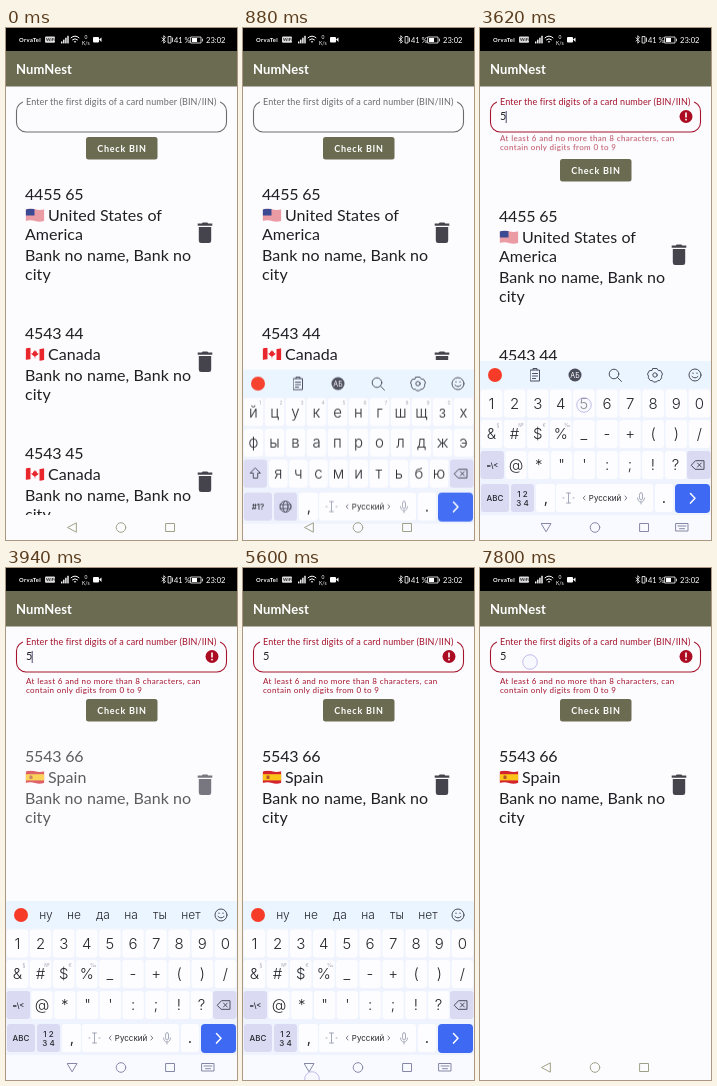
Animation, 231 px wide and 512 px high, one loop 8 s. Source, as an HTML page:

```html
<!DOCTYPE html>
<html lang="en">
<head>
<meta charset="utf-8">
<title>Card number lookup</title>
<style>
  html, body { margin: 0; width: 100%; height: 100%; overflow: hidden; background: #fcfcff; }
  svg { display: block; width: 231px; height: 512px; }
  text { font-family: Lato, "Open Sans", sans-serif; fill: #1f1e23; }
  .kb text { font-family: Inter, Roboto, sans-serif; font-feature-settings: "calt" 0; fill: #25262c; text-anchor: middle; }
  .kb .faint { fill: #a5a8b8; }
  .item text { font-size: 16px; letter-spacing: .06px; }
  .item .num { letter-spacing: -.2px; }
  .line { fill: none; stroke: currentColor; stroke-width: 1; stroke-linejoin: round; stroke-linecap: round; }
  .ring { fill: #f4f3ff80; stroke: #b3afe2; stroke-width: .8; }

  /* 1% = 80 ms */
  .field, .body, .step { animation: 8s step-end infinite; }
  .field { animation-name: field; }
  .body { animation-name: shift; }
  .typed { animation-name: typed; }
  .caret0 { animation-name: caret0; }
  .caret1 { animation-name: caret1; }
  .letters { animation-name: letters; }
  .symbols { animation-name: symbols; }
  .tools { animation-name: tools; }
  .hints { animation-name: hints; }
  .cover { animation-name: cover; }
  .nav { animation-name: nav; }
  .kbnav { animation-name: kbnav; }
  .tap5 { animation-name: tap5; }
  .tapBack { animation-name: tapBack; }
  .tapField { animation-name: tapField; }
  .helper { animation: helper 8s linear infinite; }
  .all { animation: all 8s linear infinite; }
  .found { animation: found 8s linear infinite; }
  .kb { animation: kb 8s linear infinite; }

  @keyframes field { 0% { color: #6c6a6c } 44%, 100% { color: #a5142c } }
  @keyframes shift { 0% { transform: none } 44%, 100% { transform: translateY(22px) } }
  @keyframes typed { 0% { opacity: 0 } 44%, 100% { opacity: 1 } }
  @keyframes caret0 {
    0%, 17.5%, 32.75%, 100% { opacity: 0 }
    12.5%, 25.25% { opacity: 1 }
  }
  @keyframes caret1 {
    0%, 51%, 63%, 78.25%, 92.5%, 100% { opacity: 0 }
    44%, 54.875%, 73.5%, 85% { opacity: 1 }
  }
  @keyframes letters { 0% { opacity: 1 } 26.25%, 100% { opacity: 0 } }
  @keyframes symbols { 0% { opacity: 0 } 26.25%, 100% { opacity: 1 } }
  @keyframes tools { 0% { opacity: 1 } 47.5%, 100% { opacity: 0 } }
  @keyframes hints { 0% { opacity: 0 } 47.5%, 100% { opacity: 1 } }
  @keyframes cover { 0%, 77.5%, 100% { opacity: 0 } 8% { opacity: 1 } }
  @keyframes nav { 0%, 73.5%, 100% { opacity: 1 } 12.5% { opacity: 0 } }
  @keyframes kbnav { 0%, 73.5%, 100% { opacity: 0 } 12.5% { opacity: 1 } }
  @keyframes tap5 { 0%, 45.75%, 100% { opacity: 0 } 40.25% { opacity: 1 } }
  @keyframes tapBack { 0%, 73.5%, 100% { opacity: 0 } 70% { opacity: 1 } }
  @keyframes tapField { 0% { opacity: 0 } 97.5%, 100% { opacity: 1 } }
  @keyframes helper {
    0%, 43.99% { opacity: 0; transform: translateY(-5px) }
    44% { opacity: .6; transform: translateY(-5px) }
    47%, 100% { opacity: 1; transform: none }
  }
  @keyframes all { 0%, 46.5% { opacity: 1 } 48%, 100% { opacity: 0 } }
  @keyframes found { 0%, 48% { opacity: 0 } 49.75%, 100% { opacity: 1 } }
  @keyframes kb {
    0%, 8% { opacity: 0; transform: translateY(160px) }
    9.5% { opacity: .75; transform: translateY(56.5px); animation-timing-function: ease-out }
    11.75%, 73.75% { opacity: 1; transform: none; animation-timing-function: ease-in }
    75.5% { opacity: .55; transform: translateY(30px) }
    77.25%, 100% { opacity: 0; transform: translateY(120px) }
  }
</style>
</head>
<body>
<svg id="stage" viewBox="0 0 231 512"></svg>
<script>
const BG = '#fcfcff', OLIVE = '#6b6b52';

const text = (x, y, size, str, attrs = '') =>
  `<text x="${x}" y="${y}" font-size="${size}" ${attrs}>${str}</text>`;
const rect = (x, y, w, h, fill, r = 0, attrs = '') =>
  `<rect x="${x}" y="${y}" width="${w}" height="${h}" rx="${r}" fill="${fill}" ${attrs}/>`;
const group = (cls, ...parts) => `<g class="${cls}">${parts.join('')}</g>`;
const line = (d, color, attrs = '') => `<path class="line" d="${d}" color="${color}" ${attrs}/>`;
const ring = (cls, x, y) => `<circle class="ring step ${cls}" cx="${x}" cy="${y}" r="7.3"/>`;

// Status bar
const white = 'style="fill:#fff"';
const bars = [0, 1, 2, 3].map(i => rect(55 + i * 2.1, 13.5 - i * 1.9, 1.4, 1.9 + i * 1.9, '#fff')).join('');
const status = rect(0, 0, 231, 23, '#000') +
  text(13, 14, 5.8, 'OrvaTel', `${white} font-weight="700" letter-spacing=".4"`) +
  rect(39, 8.5, 10, 6.2, '#ddd', 1) + text(40, 13.3, 4.4, 'WiFi', 'font-weight="700"') +
  bars +
  line('M65 9.8q4-3.6 8 0M66.5 11.8q2.5-2.3 5 0M68.3 13.8h1.4', '#fff', 'stroke-width="1.2"') +
  text(78.5, 10.5, 5, '0', white) + text(76, 16.5, 5, 'K/s', white) +
  rect(87, 9, 6, 5.5, '#fff', 1) + '<path d="M93 11.5l2.5-2v4.5z" fill="#fff"/>' +
  line('M156 9.8l3.600 3.600-1.800 1.800V7.700l1.800 1.800-3.600 3.600', '#fff', 'style="stroke-width:.8"') +
  line('M162.500 8.500h2.500v6.500h-2.500zM166.500 10v3.500', '#fff', 'style="stroke-width:.8"') +
  text(168, 14.5, 7.4, '41 %', white) +
  line('M185 9h10v6h-10zM196.500 11v2', '#fff', 'style="stroke-width:.8"') + rect(186, 10, 5, 4, '#fff') +
  text(200, 14.5, 7.6, '23:02', white);

const appBar = rect(0, 23, 231, 35.5, OLIVE) +
  text(10, 46, 13, 'NumNest', `${white} font-weight="700" letter-spacing=".1"`);

// Input field
const red = 'style="fill:#a5142c"';
const helper = (y, str) => text(20, y, 8, str, `${red} letter-spacing=".36"`);
const field = group('field',
  '<rect class="line" x="10.5" y="73.500" width="210" height="30.500" rx="9.500" style="stroke-width:1.100"/>',
  rect(17, 71, 197, 5, BG),
  text(20, 77, 9, 'Enter the first digits of a card number (BIN/IIN)',
    'style="fill:currentColor" letter-spacing=".11"')) +
  rect(20.5, 83, 1, 12, '#4a4a70', 0, 'class="step caret0"') +
  group('step typed',
    text(20, 92, 11, '5'),
    '<circle cx="206" cy="88.500" r="6.500" fill="#ab0c22"/>',
    rect(205.2, 84.5, 1.6, 5, '#fff'), rect(205.2, 90.8, 1.6, 1.6, '#fff')) +
  rect(25.7, 83, 1, 12, '#4a4a70', 0, 'class="step caret1"') +
  group('helper',
    helper(116, 'At least 6 and no more than 8 characters, can'),
    helper(125, 'contain only digits from 0 to 9'));

// List
const flags = {
  us: rect(0, 0, 19, 14, '#fff') +
    Array.from({ length: 7 }, (_, i) => rect(0, i * 2, 19, 1, '#d8394a')).join('') +
    rect(0, 0, 9, 7, '#3c4a94'),
  ca: rect(0, 0, 19, 14, '#fff') + rect(0, 0, 5, 14, '#e8262c') + rect(14, 0, 5, 14, '#e8262c') +
    '<path d="M9.500 2.500l1 1.800 1-.4-.2 2 1.700-.6-.4 1.600-2.600 2h-.3v2h-.5v-2h-.3l-2.600-2-.4-1.600 1.700.6-.2-2 1 .4z" fill="#e8262c"/>',
  es: rect(0, 0, 19, 14, '#d3232f') + rect(0, 3.7, 19, 6.2, '#fcc419') + rect(4, 5, 3, 3.5, '#b4552d', .5)
};
const trash = y => `<g transform="translate(199 ${y})" fill="#45444d">
  <path d="M-7.300-9.500h4l1-1h4.600l1 1h4v2.200h-14.600zM-6.200-6h12.400v13.500q0 2.500-2.300 2.500h-7.800q-2.300 0-2.300-2.500z"/></g>`;
const item = (y, num, flag, ...country) => {
  const bank = y + 21 + 19 * (country.length - 1) + 21;
  return group('item',
    text(19, y, 16, num, 'class="num"'),
    `<g transform="translate(19.5 ${y + 8.5})" clip-path="url(#wave)">${flags[flag]}</g>`,
    country.map((c, i) => text(i ? 19 : 42, y + 21 + i * 19, 16, c)).join(''),
    text(19, bank, 16, 'Bank no name, Bank no'),
    text(19, bank + 19, 16, 'city'),
    trash(y + (country.length > 1 ? 33 : 23)));
};
const body = group('body',
  rect(80, 109, 71.5, 22.5, OLIVE, 2.5),
  text(116, 124, 9, 'Check BIN', `${white} font-weight="700" text-anchor="middle" letter-spacing=".75"`),
  group('all',
    item(172, '4455 65', 'us', 'United States of', 'America'),
    item(311, '4543 44', 'ca', 'Canada'),
    item(431, '4543 45', 'ca', 'Canada')),
  group('found', item(172, '5543 66', 'es', 'Spain')));

// Keyboard
const INK = '#4b4d5c', SPECIAL = '#dadaf3';
const rows = [375.5, 406, 437, 470];
const keys = (str, row, x0, step, small = '') => str.split(' ').map((c, i) => {
  const x = x0 + i * step, y = rows[row];
  return rect(x - step / 2 + .8, y - 14, step - 1.6, 28, '#fdfdff', 3) +
    text(x, y + 5, 15, c, 'font-weight="300"') +
    (small[i] ? text(x + 6.5, y - 7.5, 5, small[i], 'class="faint"') : '');
}).join('');
const special = (x, w, row, label = '', size = 8) =>
  rect(x, rows[row] - 14, w, 28, SPECIAL, 3) +
  text(x + w / 2, rows[row] + 3, size, label, 'font-weight="500"');

const letters = group('step letters',
  keys('й ц у к е н г ш щ з х', 0, 10.5, 21, '1234567890'),
  keys('ф ы в а п р о л д ж э', 1, 10.5, 21),
  keys('я ч с м и т ь б ю', 2, 35.3, 20.1),
  special(.5, 23.5, 2),
  line('M12.500 431.500l5 5h-2.800v5h-4.400v-5h-2.800z', INK),
  special(1, 28, 3, '#1?'),
  special(31, 23, 3),
  '<circle class="line" cx="42.500" cy="470" r="5.500"/><ellipse class="line" cx="42.500" cy="470" rx="2.500" ry="5.500"/>',
  line('M37 468h11M37 472h11', INK));
const symbols = group('step symbols',
  keys('1 2 3 4 5 6 7 8 9 0', 0, 11.5, 23.1),
  keys('&amp; # $ % _ - + ( ) /', 1, 11.5, 23.1, '§№€‰'),
  keys('@ * " \' : ; ! ?', 2, 36, 22.8),
  special(.5, 23.5, 2, '=\\&lt;', 7.5),
  special(1, 28, 3, 'ABC'),
  special(31, 23, 3),
  text(42.5, 468.5, 8, '1 2', 'font-weight="500"'),
  text(42.5, 477.5, 8, '3 4', 'font-weight="500"'));

const tools = group('step tools',
  line('M50.500 342h9v11h-9zM53 342v-1.500h4v1.500M52.500 345.500h5M52.500 348h5M52.500 350.500h3', INK),
  `<circle cx="95" cy="347" r="6.500" fill="${INK}"/>`,
  text(95, 349.8, 7, 'AБ', 'style="fill:#fff"'),
  '<circle class="line" cx="134" cy="346" r="4.800"/>', line('M137.500 349.500l4 4', INK),
  line('M173 340.500h4l1.300 2 2.400.2 1.800 3.300-1 2.200 .2 1.600-2 2.700-2.200.2-1 1.300h-3l-1-1.300-2.200-.2-2-2.700.2-1.600-1-2.200 1.800-3.300 2.400-.2z', INK),
  '<circle class="line" cx="175" cy="347" r="2.200"/>');
const words = [[40, 'ну'], [68, 'не'], [97, 'да'], [125, 'на'], [154, 'ты'], [185, 'нет']];
const hints = group('step hints', ...words.map(([x, w]) => text(x, 351, 12, w, 'font-weight="300"')));

const keyboard = `<g class="kb" color="${INK}">` +
  rect(0, 333, 231, 179, '#f9faff') +
  rect(0, 333, 231, 27.5, '#ebf5ff') + rect(0, 360.5, 231, 126.5, '#eff3fd') +
  '<circle cx="15" cy="347" r="7" fill="#f63c28"/>' + tools + hints +
  '<circle class="line" cx="215" cy="347" r="6"/>' +
  line('M213 345v.6M217 345v.6M212 348.500q3 3 6 0', INK) +
  letters + symbols +
  special(207, 23.5, 2) +
  line('M211.500 437l4-4.300h8.500v8.600h-8.500zM217.500 435l3.800 4M221.300 435l-3.800 4', INK) +
  rect(56, 456, 19, 28, '#fdfdff', 3) + text(66, 475, 15, ',') +
  rect(76, 456, 97, 28, '#fdfdff', 3) + text(125, 473, 8, 'Русский') +
  line('M105 468l-1.800 2 1.800 2M145 468l1.800 2-1.800 2', '#777a8a') +
  line('M88.500 465v10M86.500 465h4M86.500 475h4M84 470h-1M93 470h1', '#a5a8b8') +
  line('M159.500 467q0-2.500 1.500-2.500t1.500 2.500v3q0 2-1.500 2t-1.500-2zM157.500 470q.5 4 3.500 4t3.500-4M161 474v2', '#a5a8b8') +
  rect(175, 456, 18, 28, '#fdfdff', 3) + text(184, 475, 15, '.') +
  rect(195, 456, 35, 29, '#3d69f3', 4) +
  line('M210.500 465.500l4.500 4.800-4.500 4.800', '#fff', 'style="stroke-width:1.500"') +
  '</g>';

// System navigation
const navRest = 'M119.800 499.500a4.800 4.800 0 1 1-9.600 0a4.800 4.800 0 1 1 9.600 0M160 495.500h8.500v8h-8.500z';
const nav = group('step nav', line('M70 495l-8.500 4.500 8.500 4.500z' + navRest, '#a0a087')) +
  group('step kbnav',
    line('M61.500 495.500h9.500l-4.700 8z' + navRest, '#8487a6'),
    line('M196 495.500h12v7.500h-12zM198 498h8M199.500 500.700h5', '#8487a6'));

document.getElementById('stage').innerHTML =
  `<defs><clipPath id="wave"><path d="M0 1.200q5-2 9.500-.4t9.500 0v11.500q-5 1.600-9.500.2t-9.500 0z"/></clipPath></defs>` +
  rect(0, 0, 231, 512, BG) + body + field + status + appBar +
  rect(0, 487, 231, 25, BG) + rect(0, 332, 231, 180, BG, 0, 'class="step cover"') +
  keyboard + nav + ring('tap5', 104, 377) + ring('tapBack', 69, 511) + ring('tapField', 50, 94);
</script>
</body>
</html>
```
